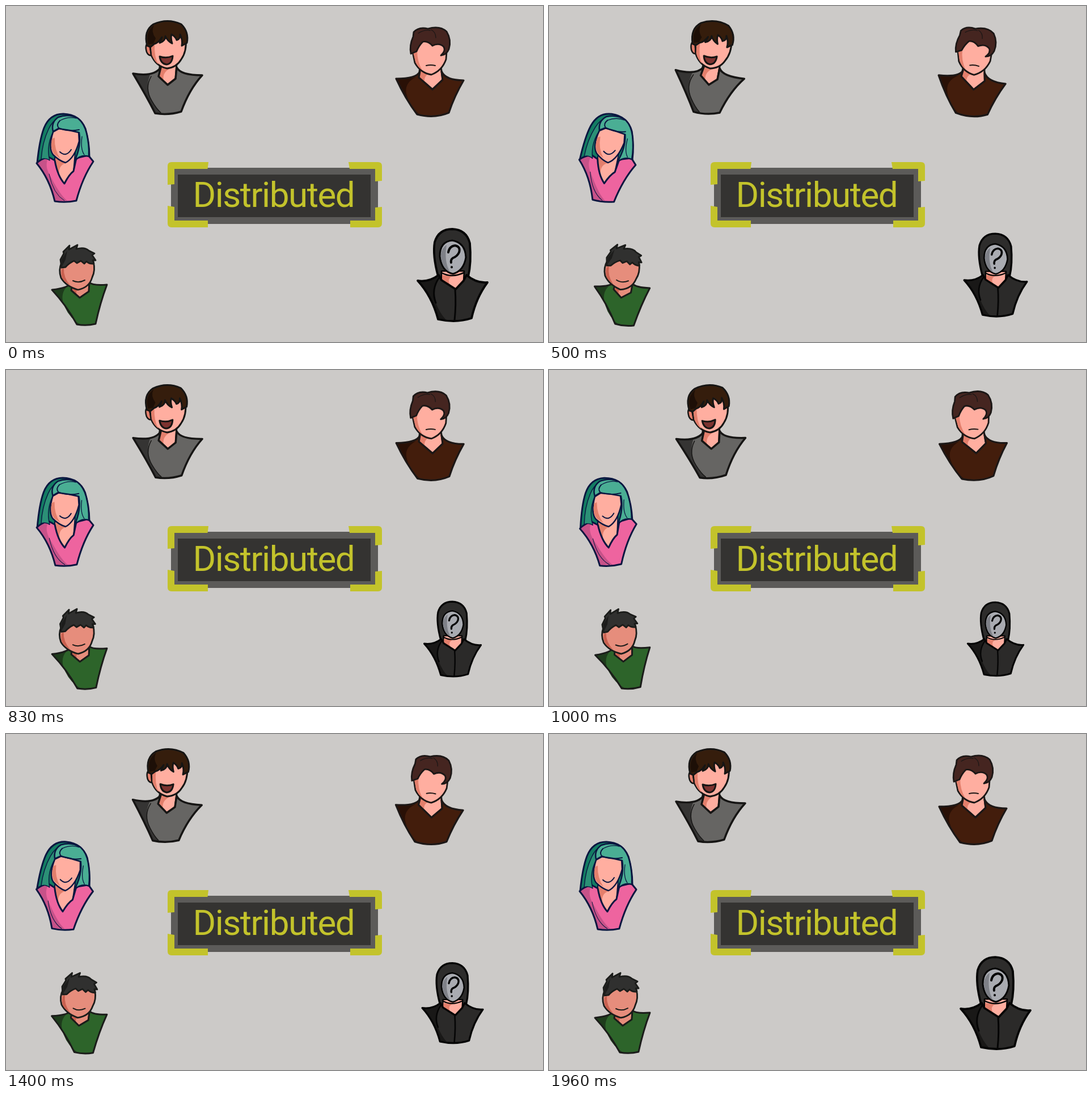
Animation of 947x592 px, one loop 2 s. Source, as an HTML page with a canvas:

```html
<!DOCTYPE html>
<html lang="en">
<head>
<meta charset="utf-8">
<title>Distributed</title>
<style>
html, body { margin: 0; width: 100%; height: 100%; overflow: hidden; background: #cccac8; }
canvas { display: block; }
</style>
</head>
<body>
<canvas id="stage" width="947" height="592"></canvas>
<script>
const ctx = document.getElementById('stage').getContext('2d');
const LOOP = 2000;
const YELLOW = '#c3c32b';
const SKIN = '#ffaea0', BLUSH = '#e37f6c';

// Each layer is [path, fill, line width]; a missing fill or width is skipped.
function figure(x, y, gain, ink, layers) {
  return { x, y, gain, ink, layers: layers.map(([d, fill, width]) => ({ path: new Path2D(d), fill, width })) };
}

const laughing = 'M224 119C248 123 265 120 273 108L269 124L285 139L299 128L301 108Q307 122 346 122Q323 147 309 186Q286 193 263 189Q248 159 224 119Z';
const frowning = 'M688 128C710 128 726 125 730 115L728 126L752 147L770 130L768 115Q775 131 807 131Q791 158 781 188Q755 199 725 191Q704 163 688 128Z';
const pink = 'M54 277Q62 269 75 266L86 272Q91 300 103 313Q111 297 119 291L124 268L145 263L154 274Q135 302 124 343Q105 347 86 344Q77 305 54 277Z';
const green = 'M81 500C100 498 113 493 117 486L115 501L130 514L146 503L147 487Q153 493 178 491Q166 523 158 560Q142 564 125 561Q107 528 81 500Z';
const dark = 'M726 484Q746 487 763 474L768 483L793 499L807 484L812 474Q830 489 849 487Q829 514 821 550Q794 559 762 552Q751 511 726 484Z';

const swingers = [
  figure(285, 109, 1, '#161514', [
    ['M272 100L269 125L285 139L299 129L301 100Z', SKIN, 3],
    ['M273 106L270 124L278 132Q275 118 288 111Z', BLUSH],
    [laughing, '#666563'],
    ['M224 119Q240 122 254 121Q245 145 256 166Q264 182 275 190L263 189Q248 159 224 119Z', '#353433'],
    ['M256 124Q244 145 257 167Q265 181 273 188', null, 1.5],
    [laughing, null, 3.5],
    ['M252 65Q244 67 248 81Q251 88 257 87Z', BLUSH, 2.5],
    ['M253 60L256 86Q264 106 284 110Q301 108 309 94Q319 80 317 58L306 45L260 48Z', SKIN, 3],
    ['M256 68L257 86Q261 97 269 103Q261 90 262 66Z', BLUSH],
    ['M249 70Q242 44 260 32Q285 21 309 32Q323 46 319 65L310 70Q312 60 307 50Q308 58 301 60Q299 54 292 50Q290 56 293 66Q285 62 281 53Q281 62 271 65L275 55Q269 65 261 67L255 72Z', '#351d0c', 3],
    ['M251 68Q245 46 261 34Q255 45 264 57L260 66Z', '#1d0f07'],
    ['M271 89Q283 93 294 88Q293 102 283 103Q273 102 271 89Z', '#7d3330', 3]
  ]),
  figure(747, 116, 1, '#1c1716', [
    ['M730 107L728 126L752 147L770 130L767 107Z', SKIN, 3],
    ['M730 113L729 126L739 136Q735 125 746 119Z', BLUSH],
    [frowning, '#431d0c'],
    ['M688 128Q708 129 723 125Q700 137 707 158Q711 176 729 191L725 191Q704 163 688 128Z', '#291006'],
    [frowning, null, 3.2],
    ['M716 76L721 100Q731 118 750 121Q769 114 776 94L778 68L758 55L724 61Z', SKIN, 2.8],
    ['M718 82L722 98Q726 108 734 113Q725 98 725 78Z', BLUSH],
    ['M714 84Q711 70 718 54L719 46Q728 36 744 40Q765 34 777 45Q786 60 781 76Q777 86 767 87Q776 79 772 72Q764 64 752 70Q744 61 735 63Q728 70 724 80Z', '#452520', 2.8],
    ['M750 42Q758 46 758 56M727 48Q738 41 748 43', null, 1.3],
    ['M741 105Q749 103 757 105', null, 2]
  ]),
  figure(104, 268, 1.2, '#0a1640', [
    ['M55 277Q59 236 67 215Q77 190 101 190Q130 191 140 216Q147 240 147 265L122 272L85 274Q70 264 55 277Z', '#137c62', 3],
    ['M86 258L86 288L103 313L119 292L122 258Z', SKIN, 2],
    ['M87 266L88 286L94 297Q92 281 105 277Z', BLUSH],
    [pink, '#ee649f'],
    ['M56 277Q64 269 74 269Q67 283 80 303Q97 335 108 343L86 344Q77 305 56 277Z', '#c75289'],
    ['M76 296Q83 331 103 343', null, 1],
    [pink, null, 3],
    ['M86 216Q70 244 77 272Q70 267 62 270Q64 240 75 217Q82 202 94 196Z', '#2b9076', 1.4],
    ['M83 222Q74 250 83 262Q94 273 105 276Q121 268 129 238L128 220L101 212Z', SKIN, 2.5],
    ['M81 234Q77 251 85 261L96 269Q85 254 86 232Z', BLUSH],
    ['M83 221Q79 205 92 196Q110 189 127 198Q138 207 142 224Q147 245 146 265Q132 261 121 273Q133 247 129 223Q110 218 92 216Z', '#4aae94', 2.5],
    ['M95 202Q88 209 93 215Q110 222 129 218', null, 2],
    ['M95 202Q110 194 124 198M134 230Q131 252 138 262', null, 1.3],
    ['M95 257Q106 267 115 253', null, 2]
  ]),
  figure(129, 492, 1.2, '#1b1c1a', [
    ['M117 482L115 502L130 514L146 503L147 482Z', '#e68d7c', 2.5],
    ['M117 490L117 501L125 508Q121 500 132 500Z', '#c8604f'],
    [green, '#2d642a'],
    ['M81 500L106 496Q94 510 104 531Q113 551 132 562L125 561Q107 528 81 500Z', '#1e3c1c'],
    [green, null, 3],
    ['M98 452Q92 465 97 479Q106 494 127 500Q147 496 152 478Q158 466 154 450L130 440Z', '#e68d7c', 2.8],
    ['M98 464Q96 478 103 485L113 492Q101 478 102 462Z', '#c8604f'],
    ['M98 461L96 447L102 436L101 433L112 422L111 429L126 421L124 428Q139 424 146 431L156 436L152 439L158 448L153 448L155 454Q147 455 142 450L138 454L132 449L125 453L120 449Q111 453 105 460Z', '#30302f', 2.8],
    ['M99 458L98 447L108 431L105 447Z', '#1c1c1b'],
    ['M118 484Q128 489 139 483', null, 2]
  ])
];

const hooded = figure(787.5, 474, 0, '#050505', [
  ['M762 476Q752 439 756 416Q763 393 787 393Q812 394 818 418Q821 452 815 477L807 486L769 485Z', '#2d2c2b', 3.8],
  ['M768 467L768 483L793 499L807 484L808 467Z', SKIN, 2.5],
  ['M769 474L769 483L783 491Q777 481 787 476Z', BLUSH],
  [dark, '#2b2a29'],
  ['M726 484Q746 488 763 476Q748 500 757 521Q765 542 777 554L762 552Q751 511 726 484Z', '#191817'],
  ['M764 478Q749 500 758 523M792 499Q794 525 791 554', null, 3],
  [dark, null, 3.8],
  ['M765 441Q765 415 787 413Q810 417 811 443Q807 467 788 472Q768 467 765 441Z', '#a9abb1', 3],
  ['M767 437Q767 461 783 469Q772 450 777 421Q769 426 767 437Z', '#7e8087'],
  ['M768 470Q786 480 807 470', null, 2.5],
  ['M780 434Q782 423 792 422Q802 424 799 434Q796 441 788 444Q784 447 785 452M786 460L786 460.2', null, 4]
]);

// Swing keys: [time, degrees]
const swingKeys = [[0, 0], [430, 6.2], [1000, -2.3], [1500, 3.7], [LOOP, 0]];
const ease = p => (1 - Math.cos(Math.PI * p)) / 2;

function swing(t) {
  const i = swingKeys.findIndex(k => k[0] > t);
  const [t0, a] = swingKeys[i - 1], [t1, b] = swingKeys[i];
  return a + (b - a) * ease((t - t0) / (t1 - t0));
}

function drawFigure(f, degrees, scale) {
  ctx.save();
  ctx.translate(f.x, f.y);
  ctx.rotate(f.gain * degrees * Math.PI / 180);
  ctx.scale(scale, scale);
  ctx.translate(-f.x, -f.y);
  ctx.strokeStyle = f.ink;
  for (const { path, fill, width } of f.layers) {
    if (fill) { ctx.fillStyle = fill; ctx.fill(path); }
    if (width) { ctx.lineWidth = width; ctx.stroke(path); }
  }
  ctx.restore();
}

const brackets = new Path2D(
  'M285 315V282Q285 275 292 275H357L355.500 287H297V314Z' +
  'M604 275H656Q663 275 663 282V308L651 309V287H606Z' +
  'M285 352L297 354V378H356V390H292Q285 390 285 383Z' +
  'M663 354V383Q663 390 656 390H607V378H651V355Z');

function box(color, x, y, w, h) {
  ctx.fillStyle = color;
  ctx.fillRect(x, y, w, h);
}

function drawSign() {
  box('#5c5b59', 291, 285, 365, 99);
  box('#343331', 303, 297, 340, 75);
  ctx.fillStyle = YELLOW;
  ctx.fill(brackets);
  ctx.font = '62px Roboto, sans-serif';
  ctx.letterSpacing = '-1.5px';
  ctx.fillText('Distributed', 329.5, 354);
}

function draw(now) {
  const t = now % LOOP;
  box('#cccac8', 0, 0, 947, 592);
  ctx.lineJoin = ctx.lineCap = 'round';
  drawSign();
  const angle = swing(t);
  for (const f of swingers) drawFigure(f, angle, 1);
  drawFigure(hooded, 0, 1 - 0.2 * ease(t / 1000));
}

const start = performance.now();
function tick() {
  draw(performance.now() - start);
  requestAnimationFrame(tick);
}
tick();
</script>
</body>
</html>
```
